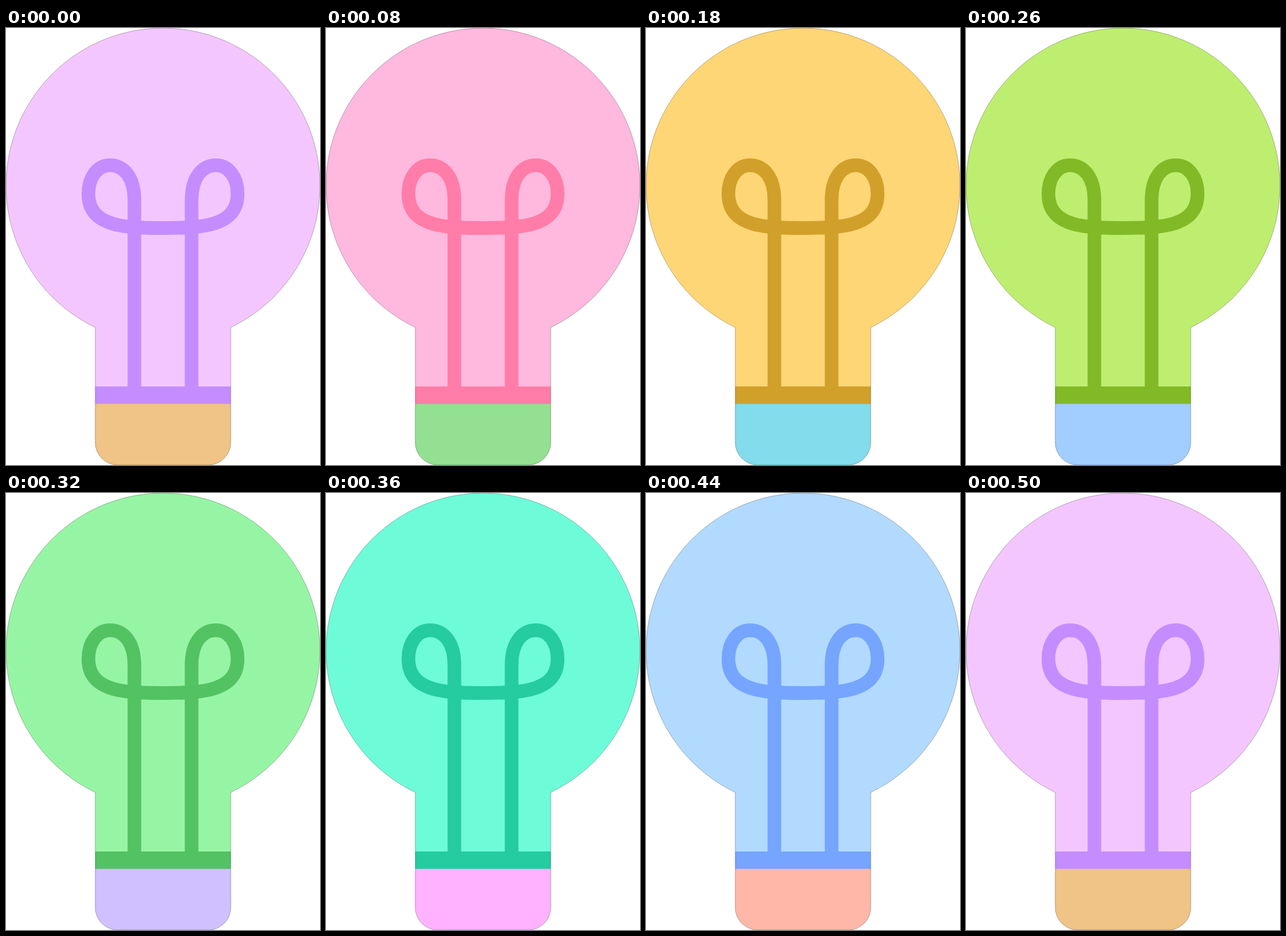
An HTML page that plays this animation: 461 by 640 pixels, repeating every 520 ms.

```html
<!DOCTYPE html>
<html lang="en">
<head>
<meta charset="utf-8">
<title>Colour-changing bulb</title>
<style>
  @property --glass { syntax: "<color>"; inherits: true; initial-value: #f4c6ff; }
  @property --wire  { syntax: "<color>"; inherits: true; initial-value: #c58cff; }
  @property --cap   { syntax: "<color>"; inherits: true; initial-value: #f0c486; }

  html, body { margin: 0; width: 100%; height: 100%; overflow: hidden; background: #fff; }
  svg { display: block; width: 461px; height: 640px; animation: hues 520ms step-end infinite; }

  .glass { fill: var(--glass); }
  .cap { fill: var(--cap); }
  .collar { fill: var(--wire); }
  .wire { fill: none; stroke: var(--wire); stroke-width: 20; }
  .rim { fill: none; stroke: #000; stroke-opacity: .5; stroke-width: .5; }

  @keyframes hues {
    0%, 100% { --glass: #f4c6ff; --wire: #c58cff; --cap: #f0c486; }
    7.6923%  { --glass: #fabfee; --wire: #e284d3; --cap: #c2d28c; }
    15.3846% { --glass: #ffb8de; --wire: #ff7da8; --cap: #94e092; }
    23.0769% { --glass: #ffc7a9; --wire: #e88e69; --cap: #8bdebe; }
    34.6154% { --glass: #ffd675; --wire: #d1a02a; --cap: #82dceb; }
    50%      { --glass: #beee70; --wire: #82b926; --cap: #a2ceff; }
    61.5385% { --glass: #96f5a4; --wire: #53c263; --cap: #d0c0ff; }
    69.2308% { --glass: #6efcd8; --wire: #24cca0; --cap: #ffb2ff; }
    76.9231% { --glass: #90ebeb; --wire: #4cb8cf; --cap: #ffb5d3; }
    84.6154% { --glass: #b2daff; --wire: #75a5ff; --cap: #ffb8a8; }
    96.1538% { --glass: #f4c6ff; --wire: #c58cff; --cap: #f0c486; }
  }
</style>
</head>
<body>
<svg viewBox="0 0 461 640">
  <defs>
    <path id="half" d="M188.5 530V252C188.5 220 174 201 152.5 201C134 201 121 219 121 243C121 272 141 287 180 291C195 292.6 212 293 231 293"/>
  </defs>
  <path class="glass" d="M131 526V438.5A230.5 230.5 0 1 1 330 438.5V526Z"/>
  <path class="cap" d="M131 550H330V607A33 33 0 0 1 297 640H164A33 33 0 0 1 131 607Z"/>
  <use class="wire" href="#half"/>
  <use class="wire" href="#half" transform="matrix(-1 0 0 1 461 0)"/>
  <path class="collar" d="M131 525H330V550.5H131Z"/>
  <path class="rim" d="M131 438.5A230.5 230.5 0 1 1 330 438.5V607A33 33 0 0 1 297 640H164A33 33 0 0 1 131 607Z"/>
</svg>
</body>
</html>
```
